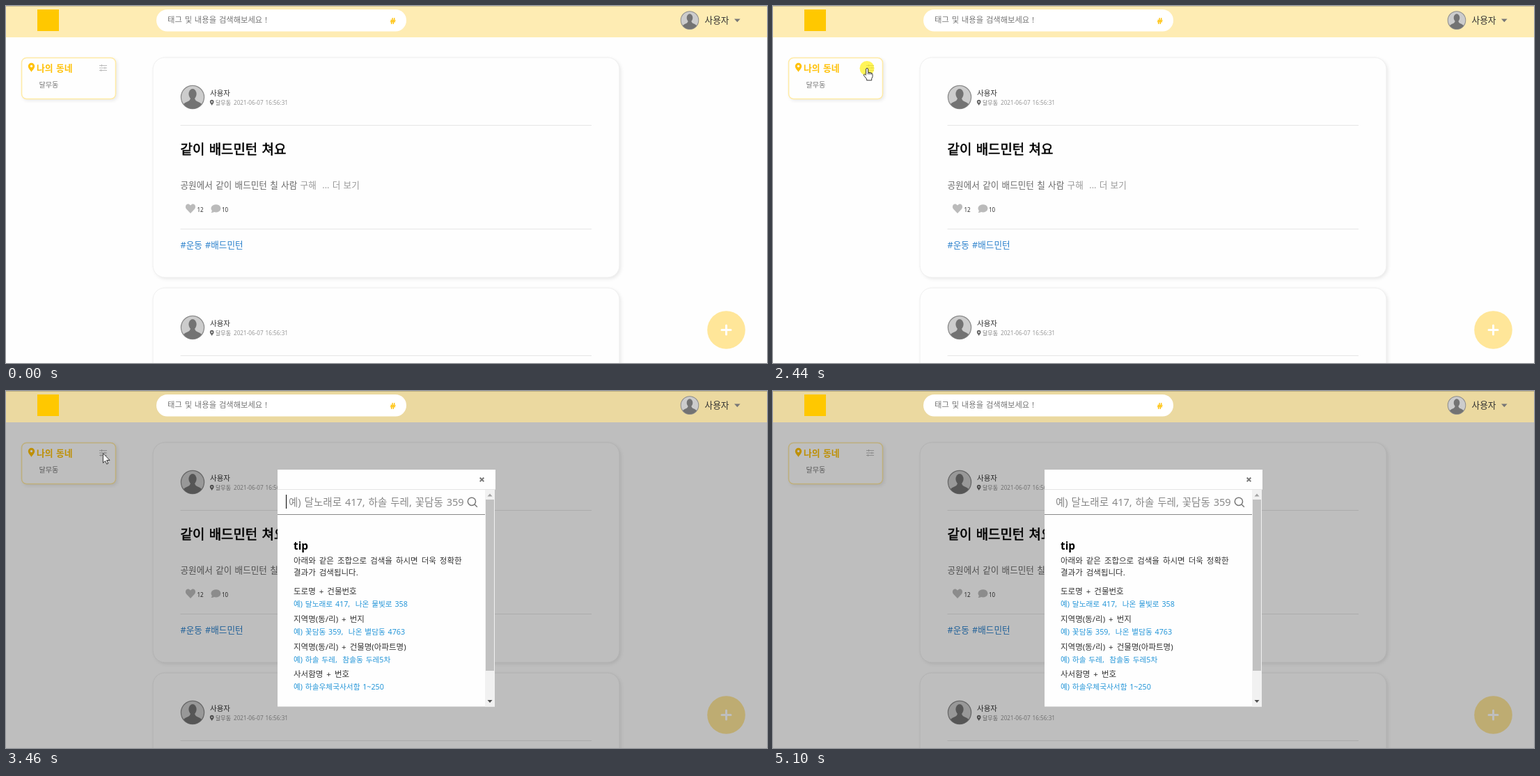
Animation of 1093 by 513 pixels, one loop 5180 ms. Source, as an HTML page:

```html
<!DOCTYPE html>
<html lang="ko">
<head>
<meta charset="utf-8">
<title>동네 모임</title>
<style>
  html, body { margin: 0; width: 100%; height: 100%; overflow: hidden; background: #fefefe; }
  svg { display: block; width: 100%; height: 100%; cursor: default; }
  text { font-family: 'Noto Sans', 'Noto Sans CJK KR', sans-serif; fill: #333; white-space: pre; word-spacing: .08em; }
  .bold { font-weight: 700; }
  .gray { fill: #777; }
  .pale { fill: #999; }
  .gold { fill: #ffc107; }
  .title { font-size: 18.9px; fill: #000; stroke: #000; stroke-width: .6; }
  .guide text { font-size: 11.5px; word-spacing: 2px; }
  .guide .example { font-size: 10.7px; word-spacing: 1px; fill: #2596d8; }
  .box { fill: #fefefe; stroke: #eee; filter: drop-shadow(2px 2px 2px #00000014); }
  .rule { stroke: #e6e6e6; }
  .cursor { fill: #fff; stroke: #222; stroke-width: .9; stroke-linejoin: round; }
</style>
</head>
<body>
<svg viewBox="0 0 1093 513">
  <defs>
    <g id="avatar">
      <circle r="16.6" fill="#ccc" stroke="#8c8c8c" stroke-width="1.3"/>
      <ellipse cy="-4.5" rx="5.6" ry="7.5" fill="#737373"/>
      <path d="M-13 10C-10 6-3.5 7-3 1H3C3.5 7 10 6 13 10A16 16 0 0 1-13 10Z" fill="#737373"/>
    </g>
    <path id="pin" fill-rule="evenodd" d="M0 6.5C-1 4-4.7 1.5-4.7-2A4.7 4.7 0 0 1 4.7-2C4.7 1.5 1 4 0 6.5ZM0-3.7a1.7 1.7 0 1 0 .01 0Z"/>
    <path id="arrow" d="M.4.6V14.3L3.5 11.4 5.7 16 7.7 15.1 5.6 10.5H10Z"/>
    <path id="hand" d="M-1.4 9.5V2a1.5 1.5 0 0 1 3 0V6.2L6 7.1Q8 7.6 8 9.6V12.5L6.7 15.3V17.8H-.4V16L-4.4 11Q-5.2 9.2-3.4 8.9L-1.4 10.5M1.6 6.2V9.2M3.8 6.8V9.4M6 7.2V9.6"/>
    <g id="card">
      <rect class="box" x="211" y="74" width="670" height="316" rx="17"/>
      <use href="#avatar" x="268" y="131"/>
      <text x="293" y="129" font-size="10.5">사용자</text>
      <use href="#pin" transform="translate(295.7 139) scale(.62)" fill="#666"/>
      <text class="gray" x="301" y="142" font-size="8">달무동</text>
      <text class="pale" x="327" y="142" font-size="8.2">2021-06-07 16:56:31</text>
      <path class="rule" d="M250.500 171.500H841M250.500 320.500H841"/>
      <text class="title" x="250.500" y="212.500">같이 배드민턴 쳐요</text>
      <text x="250.500" y="262" font-size="12.6" style="fill:#6a6a6a">공원에서 같이 배드민턴 칠 사람 <tspan class="pale">구해  ... 더 보기</tspan></text>
      <path d="M265 298L259.300 292C255.500 287.500 260.500 281 265 286.500C269.500 281 274.500 287.500 270.700 292Z" fill="#bbb"/>
      <path d="M294.500 297Q296 295.500 295.800 294A7 5.600 0 1 1 299 296Q297 297.200 294.500 297Z" fill="#bbb"/>
      <text x="274.500" y="296" font-size="8">12</text>
      <text x="310" y="296" font-size="8">10</text>
      <text x="250.500" y="347.500" font-size="12.6" style="fill:#2a80cc">#운동 #배드민턴</text>
    </g>
  </defs>

  <rect width="1093" height="513" fill="#fefefe"/>
  <use href="#card"/>
  <use href="#card" y="331"/>

  <rect class="box" x="22.500" y="74.500" width="135" height="59" rx="7" style="stroke:#ffeaa5;stroke-width:1.500"/>
  <use href="#pin" x="36.500" y="88.500" class="gold"/>
  <text class="bold gold" x="44" y="93.700" font-size="12.8">나의 동네</text>
  <text class="gray" x="47.500" y="117" font-size="10.1">달무동</text>
  <path d="M134 85.500h11M134 89h11M134 92.500h11M137.500 84v3M142 87.500v3M136.500 91v3" stroke="#bbb"/>

  <circle cx="1034.500" cy="465.500" r="27.300" fill="#ffe699"/>
  <path d="M1028 465.500h13M1034.500 459v13" stroke="#fff" stroke-width="3" stroke-linecap="round"/>

  <rect id="shade" width="1093" height="513" fill="#000" opacity=".255"/>

  <!-- the translucent header stays above the shade -->
  <rect width="1093" height="45" fill="#ffe595" opacity=".7"/>
  <path d="M0 .5H1093" stroke="#000" opacity=".18"/>
  <rect x="45" y="5" width="31" height="31" fill="#ffc800"/>
  <rect x="216" y="5" width="359" height="31.500" rx="15.700" fill="#fff"/>
  <text x="232" y="23.500" font-size="11.3" style="fill:#757575">태그 및 내용을 검색해보세요 !</text>
  <text class="bold gold" x="551.500" y="25.500" font-size="13">#</text>
  <use href="#avatar" transform="translate(982 20.500) scale(.77)"/>
  <text x="1003.500" y="25.300" font-size="12.7">사용자</text>
  <path d="M1046 18.500h8.600l-4.300 4.700Z" fill="#777"/>

  <g id="modal">
    <rect x="390" y="113" width="312" height="340.500" fill="#fefefe"/>
    <rect x="390" y="113" width="313" height="28" fill="#fefefe"/>
    <path d="M390 141.500H703" stroke="#e4e4e4"/>
    <path d="M680.700 124.500l5.600 5.600M686.300 124.500l-5.600 5.600" stroke="#777" stroke-width="2"/>
    <g id="guide" class="guide">
      <text class="bold" x="413" y="227.500" style="font-size:15.3px;fill:#000">tip</text>
      <text x="413" y="247.500">아래와 같은 조합으로 검색을 하시면 더욱 정확한</text>
      <text x="413" y="264.500">결과가 검색됩니다.</text>
      <text x="413" y="292">도로명 + 건물번호</text>
      <text x="413" y="310" class="example">예) 달노래로 417,  나온 물빛로 358</text>
      <text x="413" y="332">지역명(동/리) + 번지</text>
      <text x="413" y="350" class="example">예) 꽃담동 359,  나온 별담동 4763</text>
      <text x="413" y="372">지역명(동/리) + 건물명(아파트명)</text>
      <text x="413" y="390" class="example">예) 하솔 두레,  참솔동 두레5차</text>
      <text x="413" y="411">사서함명 + 번호</text>
      <text x="413" y="429" class="example">예) 하솔우체국사서함 1~250</text>
      <rect x="688" y="142" width="14" height="311.500" fill="#f1f1f1"/>
      <rect x="689" y="156" width="12" height="246" fill="#c1c1c1"/>
      <path d="M691.500 151.500h7l-3.500-4Z" fill="#a3a3a3"/>
      <path d="M691.500 444h7l-3.500 4Z" fill="#505050"/>
    </g>
    <g id="search">
      <path d="M390 177.500H688" stroke="#888"/>
      <text x="406" y="165" font-size="14.5" font-weight="300" style="fill:#888">예) 달노래로 417, 하솔 두레, 꽃담동 359</text>
      <path d="M674.500 158.800a5.600 5.600 0 1 0-11.200 0a5.600 5.600 0 1 0 11.200 0M672.800 162.800l4 4" fill="none" stroke="#777" stroke-width="1.500"/>
    </g>
    <path id="caret" d="M402.500 149V169" stroke="#000"/>
  </g>

  <circle id="press" cx="135" cy="89.500" r="10.500" fill="#fff000" opacity=".65"/>
  <use id="cursor" class="cursor"/>
</svg>
<script>
const LOOP = 5180, BLINK = 530;
const byId = id => document.getElementById(id);
const show = (id, visible) => byId(id).style.display = visible ? '' : 'none';

// The pointer is sampled a few times per second, so a sweep is a run of held poses.
const sweep = (start, end, count, [x0, y0], [x1, y1]) =>
  Array.from({ length: count }, (_, i) => {
    const p = i / (count - 1), ease = (p + p * p * (3 - 2 * p)) / 2;
    return [start + (end - start) * p, x0 + (x1 - x0) * ease, y0 + (y1 - y0) * ease, 'arrow'];
  });

// Each pose: start time, tip x, tip y, shape
const poses = [
  [0, 0, 0, ''],
  [460, 1074, 507, 'arrow'],
  [550, 1085, 510, 'arrow'],
  ...sweep(700, 870, 3, [960, 500], [589, 470]),
  ...sweep(1010, 1490, 7, [575, 460], [179, 167]),
  ...sweep(1570, 1890, 5, [170, 156], [125, 98]),
  [1970, 134, 89, 'hand'],
  [2120, 135, 89, 'hand'],
  [2510, 135, 89, 'arrow'],
  ...sweep(3460, 3920, 7, [138.5, 89], [587, 152]),
  [3990, 690, 158, 'arrow'],
  [4070, 763, 156, 'arrow'],
  [4150, 740, 150, 'arrow'],
  [4230, 702, 138, 'arrow'],
  [4310, 680, 130, 'hand'],
  ...sweep(4620, 5020, 6, [705, 150], [1040, 469]),
  [5100, 0, 0, '']
];

function draw(now) {
  const t = now % LOOP;
  const [, x, y, shape] = poses.findLast(pose => pose[0] <= t);
  const cursor = byId('cursor');
  show('cursor', shape);
  if (shape) cursor.setAttribute('href', '#' + shape);
  cursor.setAttribute('x', Math.round(x));
  cursor.setAttribute('y', Math.round(y));

  show('press', t >= 2440 && t < 2510);
  show('shade', t >= 2510);
  show('modal', t >= 2510);
  show('guide', t >= 2750);
  show('search', t >= 2820);
  show('caret', t >= 3050 && (t - 3050) % (2 * BLINK) < BLINK);
}

const begin = performance.now();
function tick() {
  draw(performance.now() - begin);
  requestAnimationFrame(tick);
}
tick();
</script>
</body>
</html>
```
